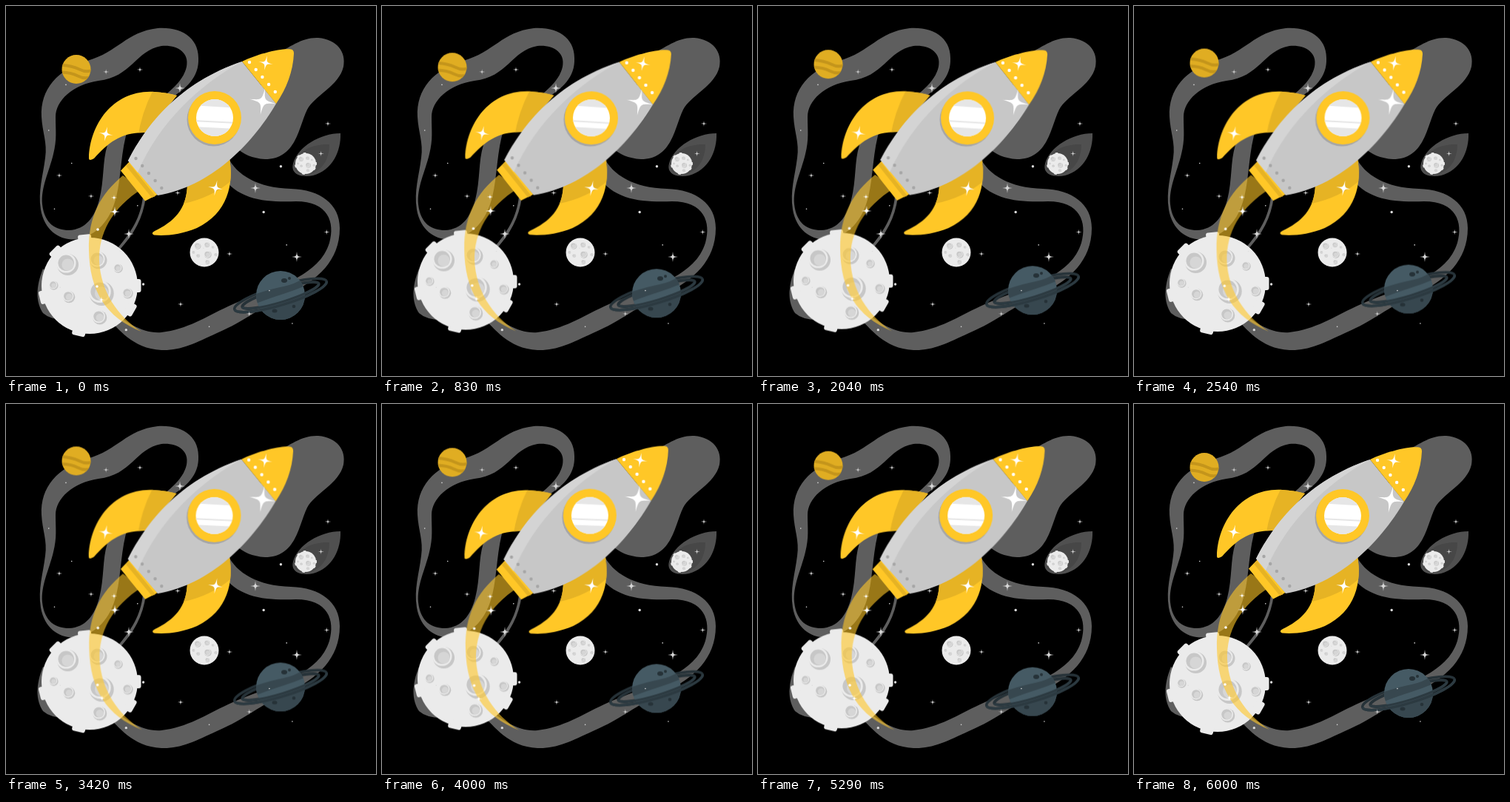
Recreate the animation shown at these times as an HTML page. Size 500 by 500 pixels, loop 6040 ms.

```html
<!DOCTYPE html>
<html lang="en">
<head>
<meta charset="utf-8">
<title>Rocket</title>
<style>
html, body { margin: 0; width: 100%; height: 100%; overflow: hidden; background: #000; }
svg { display: block; width: 100vw; height: 100vh; }
.drift, .bob, .sway { animation: drift 6.04s linear infinite; }
.bob { animation-name: bob; }
.sway { animation-name: sway; transform-origin: 250px 249px; }
/* Six seconds of motion, then a 40 ms rest */
@keyframes drift {
  0%, 99.338%, 100% { transform: translateY(0); }
  49.669% { transform: translateY(-10px); }
}
@keyframes bob {
  0%, 49.669%, 99.338%, 100% { transform: translateY(0); }
  24.834%, 74.503% { transform: translateY(-10px); }
}
@keyframes sway {
  0%, 99.338%, 100% { transform: rotate(0); }
  24.834% { transform: rotate(1deg); }
  74.503% { transform: rotate(-1deg); }
}
.gold { fill: #ffc727; }
.shade { fill: #e6b324; }
.haze { fill: #5e5e5e; }
.rock { fill: #ebebeb; }
</style>
</head>
<body>
<svg viewBox="0 0 500 500">
  <defs>
    <clipPath id="glass"><circle cx="282" cy="151" r="25"/></clipPath>
    <clipPath id="amber"><circle r="19.5"/></clipPath>
    <clipPath id="slate"><circle r="33"/></clipPath>
    <clipPath id="lowerFin"><path id="fin" d="M302 206C308 240 300 280 258 300C237 309 215 311 200 309.500Q195 307 201 304C226 292 245 275 245 240Z"/></clipPath>
    <clipPath id="upperFin"><path id="wing" d="M112 206C113 160 145 113 200 116Q218 117 231 121L190 171C155 170 138 185 119 206Q112 210 112 206Z"/></clipPath>
  </defs>

  <g class="haze">
    <path fill-rule="evenodd" d="M260 75C262 45 240 28 205 30C162 35 152 62 110 74C70 86 46 112 48 150C49 170 56 185 53 205C50 230 43 250 47 275C52 305 75 318 96 315C123 310 141 290 149 258C156 230 155 195 165 165C180 135 258 125 260 75Z
      M244 82C248 62 230 52 210 54C175 60 170 96 125 101C90 106 67 128 67 150C67 170 69 180 64 200C58 225 47 245 49 268C52 295 68 303 85 303C108 302 120 285 126 262C133 235 130 210 137 188C150 150 235 125 244 82Z"/>
    <path d="M300 205C312 228 340 246 385 247C425 248 451 268 451 300C451 345 420 370 385 388C340 408 325 425 285 442C255 456 235 466 210 465C170 463 152 435 135 420L130 400C160 428 185 443 210 441C245 437 270 420 300 406C340 388 360 384 385 372C415 356 430 342 437 320C445 292 435 264 392 264C352 265 315 264 290 228Z"/>
    <path d="M50 355C40 380 40 400 50 415Q60 424 80 424L110 400Z"/>
    <path d="M185 258C182 285 170 305 150 328L154 329C173 308 185 287 189 258Z"/>
    <path d="M360 68C385 55 400 42 422 43C447 45 460 62 456 82C450 108 418 120 407 140C395 165 392 207 350 207C333 206 320 200 312 192Z"/>
    <path d="M452 172C425 172 394 190 388 213C384 228 400 232 415 229C441 222 453 196 452 172Z" opacity=".85"/>
    <path fill="#474747" d="M437 187C415 186 395 195 389 213C387 226 402 230 414 226C429 220 437 205 437 187Z"/>
  </g>

  <g id="moons"></g>

  <g class="drift">
    <g transform="translate(95 85.5)">
      <circle r="19.500" fill="#e0ad22"/>
      <g clip-path="url(#amber)" fill="none" stroke="#c4951b" stroke-width="4">
        <path d="M-22 -6Q-6 -5 4 0T22 1M-22 4Q-8 4 2 9T20 10"/>
      </g>
    </g>
  </g>

  <g class="drift">
    <g transform="translate(371 391)">
      <g transform="rotate(-17)" fill="none" stroke="#263238">
        <ellipse rx="65" ry="13" stroke-width="3.500"/>
        <ellipse rx="54" ry="9" stroke-width="4"/>
      </g>
      <circle r="33" fill="#455a64"/>
      <g clip-path="url(#slate)" fill="#37474f">
        <path d="M-36 -1Q-12 -9 4 -12T36 -26L36 -14Q20 -7 4 -2T-36 12Z"/>
        <path d="M-36 18Q0 14 36 -4V36H-36Z"/>
        <g fill="#263238">
          <ellipse cx="5" cy="-20" rx="4" ry="3"/><circle cx="12" cy="-23" r="2"/>
          <ellipse cx="-8" cy="21" rx="3.500" ry="2.500"/><circle cx="18" cy="15" r="2.300"/>
        </g>
      </g>
      <g transform="rotate(-17)" fill="none" stroke="#2c3a41">
        <path stroke-width="3.500" d="M-65 0A65 13 0 0 0 65 0"/>
        <path stroke-width="3" d="M-54 0A54 9 0 0 0 54 0"/>
      </g>
    </g>
  </g>

  <g class="bob" id="bigMoon"></g>
  <g id="sky"></g>

  <g class="sway">
    <path class="gold" opacity=".6" d="M158 229C128 254 111 284 112 330C113 385 135 421 183 440C150 419 128 385 126 345C125 307 143 273 184 247Z"/>
    <use href="#wing" class="gold"/>
    <path class="shade" clip-path="url(#upperFin)" d="M201 110Q184 140 178 178H240V110Z"/>
    <use href="#fin" class="gold"/>
    <path class="shade" clip-path="url(#lowerFin)" d="M240 267Q282 258 310 231V200H240Z"/>
    <path class="gold" d="M155 222.500L168 209L204.500 255L188 263.500Z"/>
    <path class="shade" d="M162 216L166 212L202 257L197 259Z"/>
    <path fill="#c7c7c7" d="M165 209C190 160 234 104 319 75L365 132C332 188 276 244 205 256Z"/>
    <path fill="#d4d4d4" d="M165 209C190 160 234 104 319 75C263 105 207 157 178 225Z"/>
    <path class="gold" d="M319 75C340 65 370 57 385 58.500Q389 59 389 64C388 88 379 112 365 132Z"/>
    <g id="rivets"></g>
    <circle cx="280.500" cy="153.500" r="36" fill="#a6a6a6"/>
    <circle class="gold" cx="282" cy="151" r="36"/>
    <g clip-path="url(#glass)">
      <path fill="#fff" d="M250 120H315V180H250Z"/>
      <path fill="#e6e6e6" d="M250 120H315V138L250 134ZM250 154L315 157V159L250 156ZM250 163L315 166V180H250Z"/>
    </g>
    <g id="glints"></g>
  </g>
</svg>
<script>
const put = (id, parts) => { document.getElementById(id).innerHTML = parts.join(''); };
const repeat = (n, make) => Array.from({ length: n }, (_, i) => make(i));

const dot = (x, y, r, fill) => `<circle cx="${x}" cy="${y}" r="${r}" fill="${fill}"/>`;

function star(x, y, r, fill, turn = 0) {
  const k = r * 0.1;
  const arm = (sx, sy, ex, ey) => `C${sx * k} ${sy * k} ${sx * k} ${sy * k} ${ex * r} ${ey * r}`;
  return `<path fill="${fill}" transform="translate(${x} ${y}) rotate(${turn})" d="M0 ${-r}` +
    arm(1, -1, 1, 0) + arm(1, 1, 0, 1) + arm(-1, 1, -1, 0) + arm(-1, -1, 0, -1) + 'Z"/>';
}

// Shadowed rim, lit lip, hollow and floor
const crater = (x, y, r) =>
  dot(x + r * 0.1, y + r * 0.1, r, '#c7c7c7') +
  dot(x - r * 0.06, y - r * 0.06, r * 0.92, '#ebebeb') +
  dot(x - r * 0.06, y - r * 0.06, r * 0.74, '#c7c7c7') +
  dot(x + r * 0.1, y + r * 0.1, r * 0.56, '#d6d6d6');

// Craters as [angle, distance, size]; all moons share one face of radius 65
const pits = [[-136, 43, 14.5], [-73, 37, 11.5], [-32, 45, 6], [181, 49, 6],
  [153, 32, 8], [31, 17, 16.5], [11, 52, 7], [73, 44, 9.5]];
const bumps = [-6, -45, 90, 120, 193, 256];

function moon(x, y, r, rim) {
  const knobs = bumps.map(a =>
    `<rect class="rock" x="-9" y="-69.500" width="18" height="12" rx="3" transform="rotate(${a})"/>`);
  const holes = pits.map(([angle, reach, size]) => {
    const a = angle * Math.PI / 180;
    return crater(reach * Math.cos(a), reach * Math.sin(a), size);
  });
  return `<g transform="translate(${x} ${y}) scale(${r / 65})"><circle class="rock" r="65"/>` +
    (rim ? knobs.join('') : '') + holes.join('') + '</g>';
}

put('bigMoon', [moon(113, 378, 65, true)]);
put('moons', [moon(268, 333, 19.5, false), moon(405, 213, 14, true)]);

// Low-discrepancy scatter over the picture
const spread = (i, step, from, size) => from + size * ((i * step) % 1);
const scatter = i => [spread(i + 1, 0.7549, 50, 395), spread(i + 1, 0.5698, 62, 380)];

put('sky', [
  ...repeat(22, i => dot(...scatter(i), i % 6 ? 0.8 : 1.7, '#ddd')),
  ...repeat(6, i => star(...scatter(i + 40), 4, '#c7c7c7')),
  ...[[181, 86], [72, 229], [435, 159], [236, 403], [115, 257], [302, 335]]
    .map(([x, y]) => star(x, y, 4, '#c7c7c7')),
  ...[[235, 111], [166, 308], [337, 246], [393, 339]]
    .map(([x, y]) => star(x, y, 7, '#d6d6d6'))
]);

const row = (x, y, fill) => repeat(5, i => dot(x + i * 8.7, y + i * 10, 2.2, fill));
put('rivets', [...row(175.5, 206, '#a6a6a6'), ...row(329, 76, '#fff')]);

put('glints', [
  ...[[351, 77, 10], [347, 129, 18], [283.5, 246, 10.5], [135, 173, 10]]
    .map(([x, y, r]) => star(x, y, r, '#fff', 10)),
  ...[[147, 278, 7], [146, 259, 4], [129, 397, 4.5]]
    .map(([x, y, r]) => star(x, y, r, '#fff')),
  dot(124, 302, 1.8, '#fff'),
  dot(123, 379, 1.8, '#fff')
]);
</script>
</body>
</html>
```
